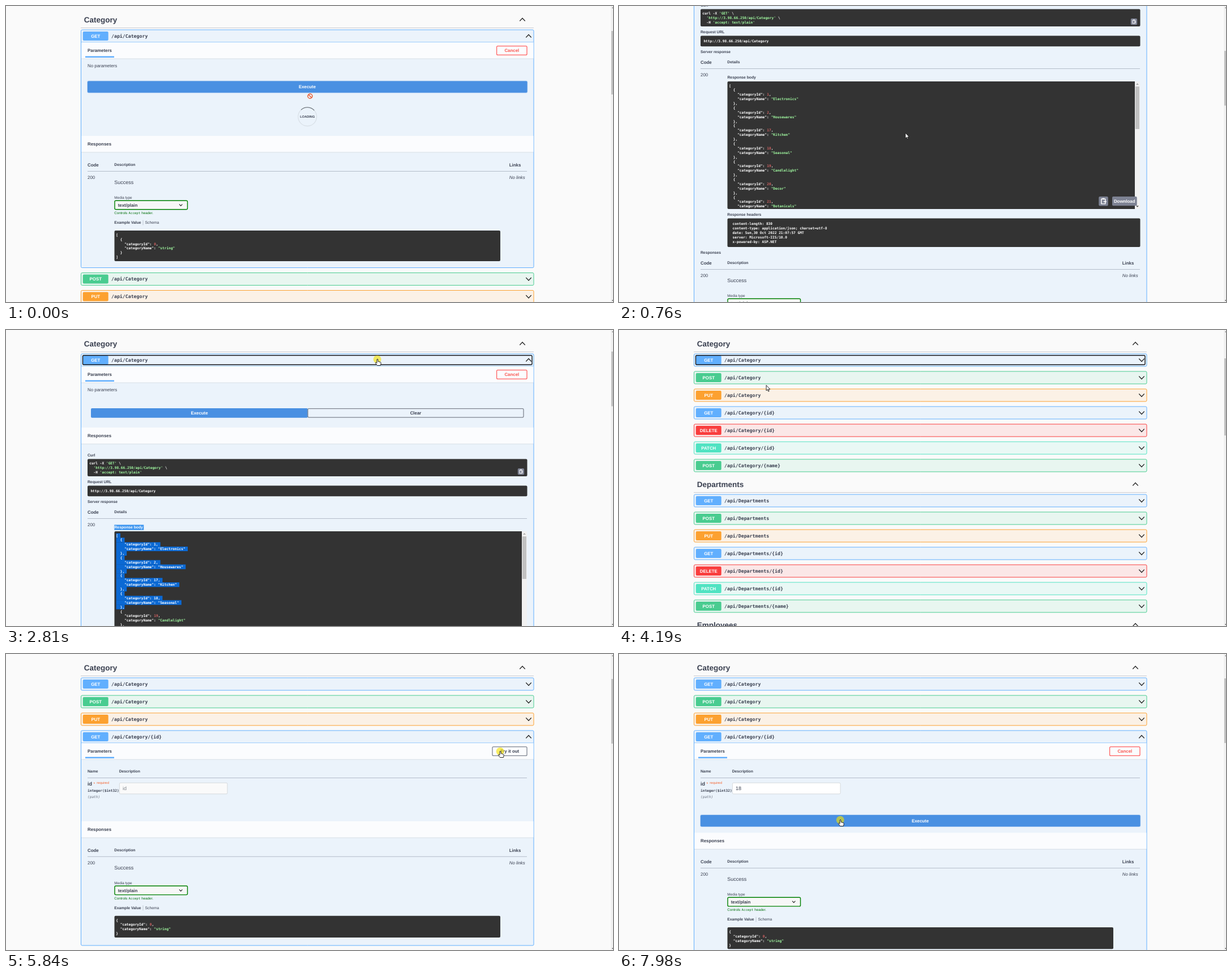
Recreate the animation shown at these times as an HTML page with a canvas. Size 1072 by 522 pixels, loop 8 s.

```html
<!DOCTYPE html>
<html lang="en">
<head>
<meta charset="utf-8">
<title>API explorer</title>
<style>
html, body { margin: 0; width: 100%; height: 100%; overflow: hidden; background: #fafafa; }
canvas { display: block; width: 1072px; height: 522px; }
</style>
</head>
<body>
<canvas id="stage" width="1072" height="522"></canvas>
<script>
const ctx = document.getElementById('stage').getContext('2d');
const LOOP = 8000;
const INK = '#3b4151', DARK = '#333333', BLUE = '#4990e2', PICK = '#0b69d4', PICK_LIGHT = '#3e96f0';
const SANS = '"Liberation Sans", Arial, sans-serif';
const MONO = '"DejaVu Sans Mono", monospace';
const SMALL = 6.76, BASE = 7.89, BIG = 9;
const LINE = 7.88;
const COLORS = { GET: '#61affe', POST: '#49cc90', PUT: '#fca130', DELETE: '#f93e3e', PATCH: '#50e3c2' };

// When the page switches to each view
const LOADED = 140, CLOSED = 2880, OPENED = 4850, EDITING = 5880;

const clamp = v => Math.max(0, Math.min(1, v));
const smooth = v => { v = clamp(v); return v * v * (3 - 2 * v); };
const span = (t, a, b) => clamp((t - a) / (b - a));

function rect(x, y, w, h, r, fill, stroke, lw = 1) {
  ctx.beginPath();
  ctx.roundRect(x, y, w, h, r);
  if (fill) { ctx.fillStyle = fill; ctx.fill(); }
  if (stroke) { ctx.strokeStyle = stroke; ctx.lineWidth = lw; ctx.stroke(); }
}

function line(points, color, lw = 1) {
  ctx.beginPath();
  points.forEach(([x, y], i) => i ? ctx.lineTo(x, y) : ctx.moveTo(x, y));
  ctx.strokeStyle = color;
  ctx.lineWidth = lw;
  ctx.stroke();
}

const rule = (x1, x2, y, color, lw) => line([[x1, y], [x2, y]], color, lw);

function text(s, x, y, size = BASE, style = '', color = INK, align = 'left') {
  ctx.font = `${style} ${size}px ${SANS}`;
  ctx.fillStyle = color;
  ctx.textAlign = align;
  ctx.fillText(s, x, y + size * 0.35);
}

const bold = (s, x, y, size, color, align) => text(s, x, y, size, 'bold', color, align);

// Monospace text; size is nominal, the advance is 0.55 of it
function mono(s, x, y, size = SMALL, color = '#fff', style = 'bold') {
  ctx.font = `${style} ${size * 0.9136}px ${MONO}`;
  ctx.fillStyle = color;
  ctx.textAlign = 'left';
  ctx.fillText(s, x, y + size * 0.32);
}

function code(s, x, y, plain) {
  if (plain) return mono(s, x, y);
  let col = 0;
  s.split(/('[^']*'|(?<=: )"[^"]*"|(?<=: )\d+)/).forEach((part, i) => {
    const color = i % 2 ? (/^\d/.test(part) ? '#d36363' : '#a2fca2') : '#fff';
    if (part.trim()) mono(part, x + col * SMALL * 0.55, y, SMALL, color);
    col += part.length;
  });
}

function chevron(x, y, up, w = 4.7, h = 2.5, color = '#222', lw = 1.2) {
  const d = up ? h : -h;
  line([[x - w, y + d], [x, y - d], [x + w, y + d]], color, lw);
}

function title(s, y) {
  bold(s, 137.7, y, 13.5);
  chevron(912, y, true);
  rule(132, 932, y + 14.6, '#c9cbd0');
}

function row(method, path, y, open, height = 22, focus) {
  const color = COLORS[method];
  ctx.globalAlpha = 0.1;
  rect(132.5, y - 11, 799.5, height, 2, color);
  ctx.globalAlpha = 1;
  rect(132.5, y - 11, 799.5, height, 2, null, color);
  if (open) rule(133, 931.5, y + 11, color);
  rect(135.7, y - 8, 45, 16, 2, color);
  bold(method, 158.3, y, BASE, '#fff', 'center');
  mono(path, 186, y, BIG, INK);
  chevron(923, y, open);
  if (focus) rect(135.5, y - 8.2, 793.5, 16.4, 2, null, '#15181f', 1.4);
}

function band(label, y) {
  rect(133, y, 798.5, 28.5, 0, 'rgba(255,255,255,0.8)');
  rule(133, 931.5, y + 29, 'rgba(0,0,0,0.09)');
  bold(label, 144, y + 14);
}

function paramsBand(y, button) {
  band('Parameters', y);
  rect(140, y + 24.6, 51, 2.3, 0, COLORS.GET);
  const cancel = button === 'Cancel';
  const x = cancel ? 866.6 : 859;
  rect(x, y + 6.6, 920 - x, 15.8, 2, null, cancel ? '#ff6060' : '#7f8590', 1.3);
  bold(button, (x + 920) / 2, y + 14, BASE, cancel ? '#f9564f' : INK, 'center');
}

function executeBar(y) {
  rect(144, y, 776.5, 20.2, 2, BLUE, 'rgba(73,144,226,0.4)', 1.5);
  bold('Execute', 532, y + 10, BASE, '#fff', 'center');
}

// Documented response table, laid out from the y of its column titles
function table(y, sample) {
  bold('Code', 144, y);
  bold('Description', 191.3, y, SMALL);
  bold('Links', 888.7, y);
  rule(144, 920, y + 11.5, '#b4bdca');
  text('200', 144, y + 22);
  text('No links', 888.7, y + 22, BASE, 'italic');
  text('Success', 191.3, y + 31, BIG);
  text('Media type', 191.3, y + 58, 6.4);
  rect(192, y + 63.2, 128.5, 15.6, 2, '#f7f7f7', '#008000', 1.4);
  bold('text/plain', 197.7, y + 71);
  chevron(308.7, y + 71, false, 2.7, 1.4, '#222', 1.1);
  text('Controls', 191.3, y + 85, 6.2, '', '#00700a');
  mono('Accept', 216.6, y + 85, 6.2, '#00700a', '');
  text('header.', 239.3, y + 85, 6.2, '', '#00700a');
  bold('Example Value', 191.3, y + 102, SMALL);
  line([[242, y + 97.5], [242, y + 106.5]], '#b4bdca', 0.8);
  text('Schema', 245.5, y + 102, SMALL);
  rect(191.5, y + 116, 681.5, sample.length * LINE + 6.7, 2, DARK);
  sample.forEach((s, i) => code(s, 194.3, y + 123.6 + i * LINE));
}

const ITEM = ['{', '  "categoryId": 0,', '  "categoryName": "string"', '}'];
const LIST = ['[', ...ITEM.map(s => '  ' + s), ']'];
const FIRST = [[1, 'Electronics'], [2, 'Housewares'], [17, 'Kitchen'], [18, 'Seasonal'],
  [19, 'Candlelight'], [20, 'Decor'], [21, 'Botanicals']];
const BODY = ['['].concat(...FIRST.map(([id, name]) =>
  ['  {', `    "categoryId": ${id},`, `    "categoryName": "${name}"`, '  },']));
const HEADERS = ['content-length: 830', 'content-type: application/json; charset=utf-8',
  'date: Sun,30 Oct 2022 21:07:57 GMT', 'server: Microsoft-IIS/10.0', 'x-powered-by: ASP.NET'];
const CURL = ["curl -X 'GET' \\", "  'http://3.98.66.250/api/Category' \\", "  -H 'accept: text/plain'"];

function copyIcon(x, y, size) {
  rect(x, y, size, size, 2, '#7d8293');
  const u = size / 10;
  rect(x + 2.8 * u, y + 2.6 * u, 4.2 * u, 5.2 * u, 0.5, null, '#fff', 0.9 * u);
  rect(x + 3.9 * u, y + 1.7 * u, 2 * u, 1.5 * u, 0, '#fff');
  line([[x + 8.2 * u, y + 5.4 * u], [x + 5 * u, y + 5.4 * u]], '#fff', 0.9 * u);
}

function loader(t) {
  ctx.lineWidth = 1.1;
  ctx.strokeStyle = 'rgba(85,85,85,0.13)';
  ctx.beginPath(); ctx.arc(532.3, 195.2, 16.4, 0, 7); ctx.stroke();
  const a = -2.32 + t / 1000 * Math.PI * 2;
  ctx.strokeStyle = '#5f666e';
  ctx.beginPath(); ctx.arc(532.3, 195.2, 16.4, a, a + Math.PI / 2); ctx.stroke();
  bold('LOADING', 532.3, 195.5, 5.63, INK, 'center');
}

const LAST_PICKED = 16, BODY_TOP = 355;

// First selected body line; -1 also takes the heading, Infinity is none
function pickStart(t) {
  if (t < 1080) return Infinity;
  const top = Math.floor((cursorAt(t).y + scrollAt(t) - BODY_TOP - 3) / LINE);
  return t > 1600 || top < 0 ? -1 : top;
}

function responseBody(t) {
  const start = pickStart(t), all = start < 0;
  if (all) rect(191.3, 343.4, 52, 9.4, 0, PICK_LIGHT);
  bold('Response body', 191.5, 348, SMALL, all ? '#fff' : INK);
  rect(191.5, BODY_TOP, 728.5, 225, 2, DARK);
  ctx.save();
  ctx.beginPath(); ctx.rect(191.5, BODY_TOP, 728.5, 225); ctx.clip();
  BODY.forEach((s, i) => {
    const y = BODY_TOP + 7.4 + i * LINE;
    const on = i >= start && i <= LAST_PICKED;
    const len = s.length + (i < LAST_PICKED ? 1 : 0);
    if (on) rect(194.6, y - 4, len * SMALL * 0.55, LINE + 0.2, 0, PICK);
    code(s, 194.3, y, on);
  });
  rect(911, BODY_TOP, 9, 225, 0, '#f1f1f1');
  rect(912, BODY_TOP + 9, 7, 75, 0, '#c1c1c1');
  chevron(915.5, BODY_TOP + 5, true, 1.6, 0.8, '#999', 1.2);
  chevron(915.5, BODY_TOP + 220, false, 1.6, 0.8, '#444', 1.2);
  ctx.restore();
  copyIcon(847.3, 558, 16.5);
  rect(871, 558, 43.7, 16.3, 2, '#7d8293');
  if (all) rect(873.3, 560.4, 40.2, 11, 0, '#3f8ce6');
  bold('Download', 892.7, 566, BASE, '#fff', 'center');
}

function result(t) {
  // The left button grows into its half of the group
  const u = span(t, LOADED, LOADED + 300);
  const grow = 1 - Math.pow(1 - u, 1.75);
  const w = Math.max(75, 45 + 676 * grow / (1 + grow));
  rect(150, 138, w, 16.8, 2, BLUE);
  bold('Execute', 150 + w / 2, 146.5, BASE, '#fff', 'center');
  rect(150 + w, 138.7, 764 - w, 15.4, 2, null, '#7f8590', 1.3);
  bold('Clear', (150 + w + 914) / 2, 146.5, BASE, INK, 'center');

  band('Responses', 172);
  bold('Curl', 144, 220.5, SMALL);
  rect(144, 227.5, 776.5, 30.5, 2, DARK);
  CURL.forEach((s, i) => code(s, 147.2, 235 + i * LINE));
  copyIcon(903.8, 244, 11.3);
  bold('Request URL', 144, 267.5, SMALL);
  rect(144, 274.5, 776.5, 18.8, 2, DARK);
  mono('http://3.98.66.250/api/Category', 149.4, 284);
  bold('Server response', 144, 303, SMALL);
  bold('Code', 144, 321);
  bold('Details', 191.3, 321, SMALL);
  rule(144, 920, 332.5, '#b4bdca');
  text('200', 144, 343);
  responseBody(t);
  bold('Response headers', 191.3, 589.8, SMALL);
  rect(191.5, 596.5, 729, 50.5, 2, DARK);
  HEADERS.forEach((s, i) => code(s, 200.6, 606.3 + i * LINE, true));
  bold('Responses', 144, 656.5, SMALL);
  table(675, LIST);
}

function listPanel(t) {
  paramsBand(64, 'Cancel');
  text('No parameters', 144, 105.5);
  if (t < LOADED) {
    executeBar(132.5);
    loader(t);
    band('Responses', 229);
    table(280, LIST);
  } else result(t);
}

function itemPanel(t) {
  const edit = t >= EDITING, dy = edit ? 20.3 : 0;
  paramsBand(157, edit ? 'Cancel' : 'Try it out');
  bold('Name', 144, 207, SMALL);
  bold('Description', 199.7, 207, SMALL);
  rule(144, 920, 218.5, '#b4bdca');
  bold('id', 144, 229, BIG);
  text('*', 154.6, 229, 7, '', '#f4622d');
  text('required', 160.3, 227, 5.9, '', '#f4622d');
  mono('integer($int32)', 144, 241, SMALL, INK);
  mono('(path)', 144, 252, SMALL, '#6b7280', 'italic');
  rect(200.4, 227.2, 190.6, 19.6, 2, edit ? '#fff' : '#fafafa', '#d6d9dd');
  const typed = t < 6980 ? '' : t < 7085 ? '1' : '18';
  text(typed || 'id', 206, 237, BIG, '', typed ? INK : '#80858d');
  if (edit) executeBar(284);
  band('Responses', 295 + dy);
  table(345.8 + dy, ITEM);
}

const PATHS = [['GET', ''], ['POST', ''], ['PUT', ''], ['GET', '/{id}'], ['DELETE', '/{id}'],
  ['PATCH', '/{id}'], ['POST', '/{name}']];

function group(name, y, open, height, focus) {
  title(name, y);
  y += 29;
  PATHS.forEach(([method, tail], i) => {
    const isOpen = i === open;
    row(method, '/api/' + name + tail, y, isOpen, isOpen ? height : 22, i === focus);
    y += isOpen ? height + 9 : 31;
  });
  return y + 2;
}

function page(t) {
  let open = -1, height = 0, focus = -1;
  if (t < CLOSED) { open = 0; height = t < LOADED ? 419.5 : 814.5; }
  else if (t >= OPENED) { open = 3; height = t < EDITING ? 379 : 399.3; }
  if (t >= 2770 && t < 4730) focus = 0;
  else if (t >= 4730 && t < 5770) focus = 3;
  let y = group('Category', 24, open, height, focus);
  if (y < 600) {
    y = group('Departments', y, -1);
    title('Employees', y);
  }
  if (open === 0) listPanel(t);
  if (open === 3) itemPanel(t);
}

const scrollAt = t => 222 * (smooth((t - 263) / 500) - smooth(span(t, 2150, 2340)));

function scrollbar(t) {
  rect(1068, 0, 4, 522, 0, '#f1f1f1');
  let top = 44, len = 112;
  if (t >= EDITING) { top = 43; len = 114; }
  else if (t >= OPENED) len = 114;
  else if (t >= CLOSED) { top = 50; len = 136; }
  else if (t >= LOADED) { top = 38 + scrollAt(t) * 0.185; len = 96.5; }
  rect(1069, top, 3, len, 0, '#c1c1c1');
  rect(1070.5, 2.5, 1.5, 1.5, 0, '#777');
  rect(1070.5, 518.5, 1.5, 1.5, 0, '#444');
}

// Pointer stops: time, x, y
const STOPS = [[0, 537, 159], [130, 536, 161], [330, 521, 214], [640, 515, 222], [850, 500, 225],
  [1070, 211, 264], [1600, 165, 122], [1720, 166, 121], [2120, 778, 113], [2520, 778, 113],
  [2750, 656, 51], [2900, 656, 51], [3300, 273, 81], [3380, 269, 81], [3510, 269, 81],
  [3710, 266, 81], [4120, 266, 81], [4195, 260, 97.5], [4600, 257, 147], [4920, 257, 147],
  [5740, 873, 171], [5920, 873, 171], [6440, 345, 238], [7340, 345, 238], [7920, 391, 292], [8001, 391, 292]];
const SHAPES = [[0, 'ban'], [140, 'arrow'], [900, 'beam'], [1720, 'arrow'], [2690, 'hand'], [4150, 'arrow'],
  [4250, 'hand'], [5120, 'arrow'], [5680, 'hand'], [5970, 'arrow'], [6370, 'beam'], [6950, 'none'],
  [7360, 'beam'], [7480, 'arrow'], [7840, 'hand']];
const CLICKS = [[2770, 2900], [4730, 4860], [5770, 5900], [6430, 6550], [7930, 8000]];

function cursorAt(t) {
  const i = STOPS.findIndex(s => s[0] > t);
  const [t0, x0, y0] = STOPS[i - 1], [t1, x1, y1] = STOPS[i];
  const k = smooth(span(t, t0, t1));
  return { x: x0 + (x1 - x0) * k, y: y0 + (y1 - y0) * k };
}

const ARROW = new Path2D('M0 0V9.6L2.2 7.6L3.7 11L5.2 10.3L3.7 7.1H6.7Z');
const HAND = new Path2D('M-1 1Q0 -1 1 1V4.5L5 5.5Q6.5 6 6.2 8L5.4 11.5H-.4L-3.5 7.6Q-3.7 6 -2.5 6.2L-1 7.5Z');

function pointer(t) {
  const { x, y } = cursorAt(t);
  const shape = SHAPES.filter(s => s[0] <= t).pop()[1];
  if (CLICKS.some(([a, b]) => t >= a && t < b)) {
    ctx.fillStyle = 'rgba(245,226,0,0.62)';
    ctx.beginPath(); ctx.arc(x - 0.3, y + 0.8, 7, 0, 7); ctx.fill();
  }
  ctx.save();
  ctx.translate(x, y);
  if (shape === 'ban') {
    ctx.strokeStyle = '#ea5a2e';
    ctx.lineWidth = 1.5;
    ctx.beginPath(); ctx.arc(0, 0, 4, 0, 7); ctx.stroke();
    line([[-2.8, -2.8], [2.8, 2.8]], '#ea5a2e', 1.5);
  } else if (shape === 'beam') {
    const c = t < 1720 && x > 192 && y > 133 ? '#ddd' : '#333';
    line([[0, -5], [0, 5]], c);
    rule(-1.8, 1.8, -5, c);
    rule(-1.8, 1.8, 5, c);
  } else if (shape !== 'none') {
    const p = shape === 'hand' ? HAND : ARROW;
    ctx.fillStyle = '#fff';
    ctx.strokeStyle = '#111';
    ctx.lineWidth = 0.9;
    ctx.fill(p);
    ctx.stroke(p);
  }
  ctx.restore();
}

function draw(now) {
  const t = now % LOOP;
  ctx.textRendering = 'geometricPrecision';
  rect(0, 0, 1072, 522, 0, '#fafafa');
  ctx.save();
  ctx.translate(0, -scrollAt(t));
  page(t);
  ctx.restore();
  scrollbar(t);
  pointer(t);
  requestAnimationFrame(draw);
}
requestAnimationFrame(draw);
</script>
</body>
</html>
```
